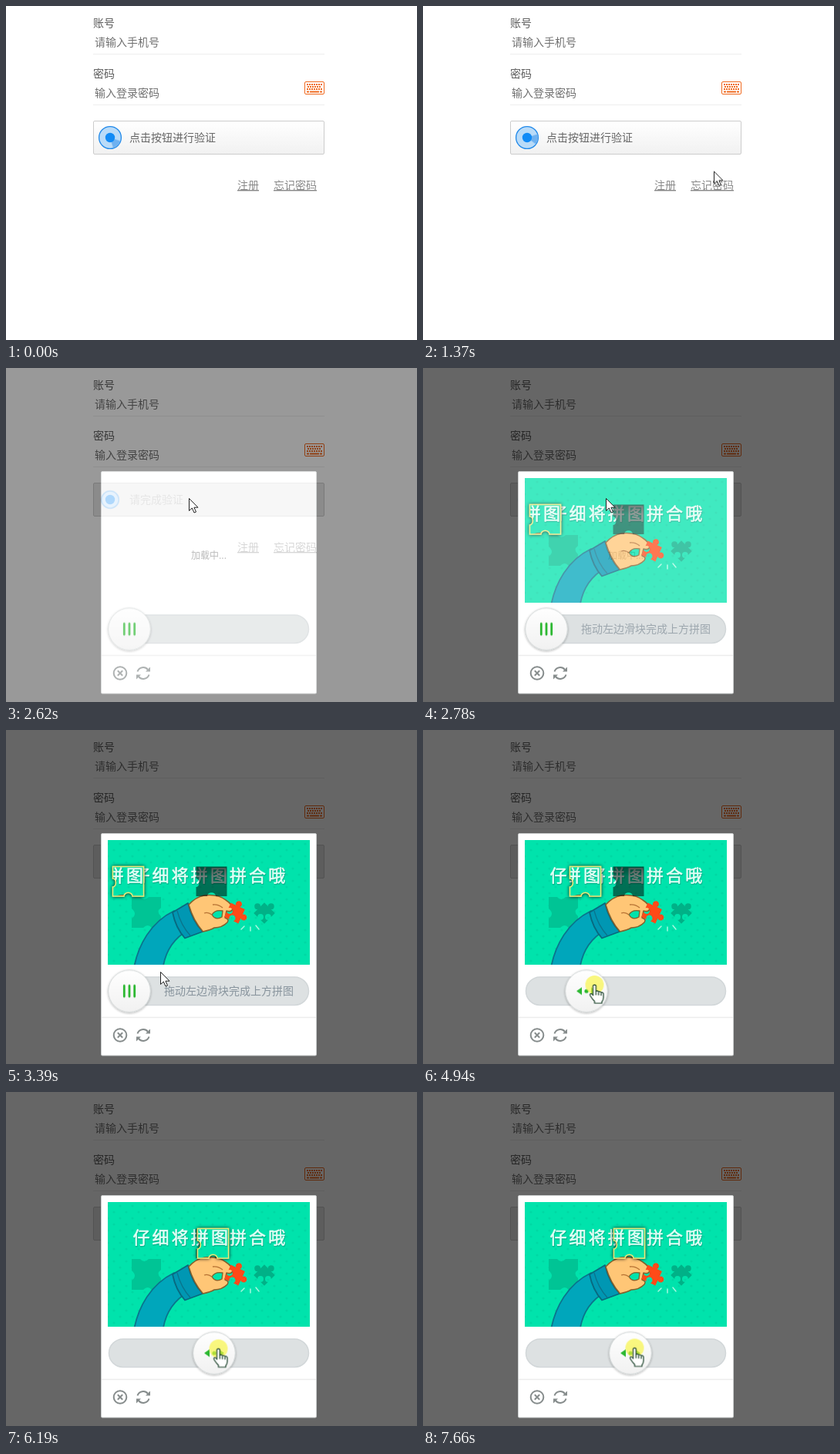
An HTML page for the animation above (8000 ms loop, 533 by 434 pixels).

```html
<!DOCTYPE html>
<html lang="zh">
<head>
<meta charset="utf-8">
<title>滑块验证</title>
<style>
html, body { margin: 0; width: 100%; height: 100%; overflow: hidden; background: #fff; }
svg { display: block; width: 533px; height: 434px; }
text { font: 14px "Noto Sans CJK SC", "Noto Sans CJK", "Noto Sans", sans-serif; }
.link { fill: #888; text-decoration: underline; }
.title { font-size: 22px; font-weight: 500; letter-spacing: 3.1px; stroke-linejoin: round; }

.idle, .done, .arrow, .hand, .press, .rest, .sector, .turn, .ring,
.modal, .load, .drag, .cursor { animation: 8s step-end infinite; }
.idle { animation-name: idle; }
.done { animation-name: done; }
.arrow { animation-name: arrow; }
.hand { animation-name: hand; }
.press { animation-name: press; }
.rest { animation-name: rest; }
.sector { animation-name: sector; }
.ring { animation-name: ring; }
.modal { animation-name: modal; }
.load { animation-name: load; }
.turn { animation-name: turn; }
.drag { animation-name: drag; }
.cursor { animation-name: cursor; }

@keyframes idle { 0% { opacity: 1 } 29.75%, 100% { opacity: 0 } }
@keyframes done { 0% { opacity: 0 } 29.75%, 100% { opacity: 1 } }
@keyframes arrow { 0% { opacity: 0 } 6.375% { opacity: 1 } 20.1% { opacity: 0 } 29.75% { opacity: 1 } 45.4%, 100% { opacity: 0 } }
@keyframes hand { 0% { opacity: 0 } 20.1% { opacity: 1 } 29.75% { opacity: 0 } 45.4%, 100% { opacity: 1 } }
@keyframes press { 0% { opacity: 0 } 57%, 100% { opacity: 1 } }
@keyframes rest { 0% { opacity: 1 } 57%, 100% { opacity: 0 } }
@keyframes sector { 0% { opacity: 1 } 20.1%, 100% { opacity: 0 } }
@keyframes ring {
  0% { transform: scale(1) }
  20.1% { transform: scale(1); animation-timing-function: steps(4, start) }
  24% { transform: scale(.87) }
  31.7%, 100% { transform: scale(.78) }
}
@keyframes modal {
  0% { opacity: 0 }
  31.7% { opacity: 0; animation-timing-function: steps(3, start) }
  34.6%, 100% { opacity: 1 }
}
@keyframes load {
  0% { opacity: 0 }
  33.7% { opacity: .35 }
  34.7% { opacity: .75; animation-timing-function: steps(5, end) }
  39.375%, 100% { opacity: 1 }
}
@keyframes turn {
  0% { transform: rotate(46deg) }
  6.375% { transform: rotate(46deg); animation-timing-function: steps(11, start) }
  17.125% { transform: rotate(11deg); animation-timing-function: steps(4, start) }
  20.1%, 100% { transform: rotate(4deg) }
}
@keyframes drag {
  0% { transform: translateX(0) }
  57% { transform: translateX(0); animation-timing-function: steps(6, start) }
  62.7% { transform: translateX(52px); animation-timing-function: steps(5, start) }
  67.625% { transform: translateX(90px); animation-timing-function: steps(2, start) }
  69.625% { transform: translateX(98px) }
  70.625% { transform: translateX(98px); animation-timing-function: steps(6, start) }
  76.375% { transform: translateX(108px) }
  77.375% { transform: translateX(110px) }
  95.75%, 100% { transform: translateX(109px) }
}
@keyframes cursor {
  0% { transform: translate(426px, 408px) }
  6.375% { transform: translate(426px, 408px); animation-timing-function: steps(11, start) }
  17.125% { transform: translate(391px, 219px); animation-timing-function: steps(11, start) }
  28% { transform: translate(237px, 169px) }
  35.7% { transform: translate(237px, 169px); animation-timing-function: steps(5, start) }
  40.375% { transform: translate(233px, 213px); animation-timing-function: steps(3, start) }
  43.3% { transform: translate(200px, 314px); animation-timing-function: steps(4, start) }
  47.375% { transform: translate(169px, 331px) }
  48.375% { transform: translate(167px, 332px) }
  49.2% { transform: translate(165.5px, 332px) }
  57% { transform: translate(165.5px, 332px); animation-timing-function: steps(6, start) }
  62.7% { transform: translate(222.5px, 331px); animation-timing-function: steps(5, start) }
  67.625% { transform: translate(258px, 333px); animation-timing-function: steps(2, start) }
  69.625% { transform: translate(264.5px, 333px) }
  70.625% { transform: translate(264.5px, 333px); animation-timing-function: steps(6, start) }
  76.375% { transform: translate(273.5px, 333px) }
  77.375% { transform: translate(275.5px, 333.5px) }
  95.75%, 100% { transform: translate(274.5px, 332.5px) }
}
</style>
</head>
<body>
<svg viewBox="0 0 533 434">
<defs>
  <linearGradient id="face" x2="0" y2="1"><stop stop-color="#fff"/><stop offset="1" stop-color="#f1f1f1"/></linearGradient>
  <linearGradient id="shade" x2="0" y2="1"><stop stop-color="#000" stop-opacity=".66"/><stop offset=".35" stop-color="#000" stop-opacity=".5"/><stop offset="1" stop-color="#000" stop-opacity=".52"/></linearGradient>
  <pattern id="dots" width="16" height="16" patternUnits="userSpaceOnUse">
    <g fill="#00d8a4"><circle cx="4" cy="4" r="1.6"/><circle cx="12" cy="12" r="1.6"/></g>
  </pattern>
  <filter id="glow" x="-30%" y="-30%" width="160%" height="160%"><feDropShadow dx="0" dy="0" stdDeviation="2" flood-color="#000" flood-opacity=".95"/></filter>
  <filter id="soft" x="-20%" y="-20%" width="140%" height="140%"><feDropShadow dx="0" dy="1" stdDeviation="1.6" flood-color="#000" flood-opacity=".3"/></filter>
  <clipPath id="frame"><path d="M132 143h262v162h-262z"/></clipPath>
  <path id="cut" d="M247.500 177.500h40v38.500h-14.500a5.500 4.800 0 0 0-11 0h-14.500v-12a4 5.500 0 0 0 0-11z"/>
  <clipPath id="cutClip"><use href="#cut"/></clipPath>
  <path id="jig" d="M-9-9H-2.500a3.600 3.600 0 1 1 5 0H9V-2.500a3.600 3.600 0 1 1 0 5V9H2.500a3.600 3.600 0 1 0-5 0H-9V2.500a3.600 3.600 0 1 0 0-5z"/>

  <g id="art">
    <path fill="#00e3ac" d="M132 143h262v162h-262z"/>
    <path fill="url(#dots)" d="M132 143h262v162h-262z"/>
    <path fill="#00c495" d="M163 217h11q5 6 11 0h16v14q-7 5 0 11v15h-12q-5-6-11 0h-15v-12q8-6 0-13z"/>
    <use href="#jig" fill="#00b187" transform="translate(335 238) rotate(-45) scale(1.080)"/>
    <g stroke-width="1.800" stroke-linejoin="round">
      <path fill="#00a6bb" stroke="#0a748c" d="M166.500 306C172 280 187 250 218 235L236 260C219 270 208 285 204 306z"/>
      <path fill="#0097b3" stroke="#08697f" d="M216 237L236 225Q241 247 255 262L232 270.500Q220 257 216 237z"/>
      <path fill="none" stroke="#0a748c" stroke-width="1.300" d="M222 235Q227 254 239 267"/>
      <path fill="#ffc676" stroke="#84602c" stroke-width="1.500" d="M237 227Q246 217 257 215Q275 213 285 221Q293 226 294 232Q293 237 286 235L284 244Q290 246 287 250Q280 257 270 257Q265 260 255.500 262Q243 248 237 227z"/>
      <path fill="#00e3ac" stroke="#84602c" stroke-width="1.300" d="M267 240Q271 233 281 235L280 243Q272 248 267 240z"/>
      <path fill="none" stroke="#b67334" stroke-width="1.300" d="M267 240Q262 236 257 238M281 231Q275 226 268 227"/>
    </g>
    <use href="#jig" fill="#ff4a18" transform="translate(296.500 238) rotate(25) scale(1.120)"/>
    <path stroke="#a5f7df" stroke-width="1.500" stroke-linecap="round" d="M309 255l-4 4M317 256v5M324 254l4 5"/>
    <text class="title" x="165" y="198" fill="#008a70" stroke="#008a70" stroke-width="1.500" opacity=".45">仔细将拼图拼合哦</text>
    <text class="title" x="164.500" y="197" fill="#e4fff6" stroke="#e4fff6" stroke-width=".6">仔细将拼图拼合哦</text>
  </g>
</defs>

<path fill="#fff" d="M0 0h533v434H0z"/>
<g fill="#5c5c5c"><text x="113" y="27">账号</text><text x="113" y="93">密码</text></g>
<g fill="#707070"><text x="115" y="52">请输入手机号</text><text x="115" y="118">输入登录密码</text></g>
<path stroke="#eee" d="M113 62.500h300M113 128.500h300"/>
<g fill="none" stroke="#f0691e">
  <rect x="387.500" y="98.500" width="25" height="16" rx="1.500"/>
  <g stroke-width="2"><path stroke-dasharray="2 1" d="M390 102h20M390 108h20"/><path stroke-dasharray="2 1" d="M391 105h18"/><path d="M390 111.500h3M394 111.500h12M407 111.500h3"/></g>
</g>

<g class="idle">
  <rect x="113.500" y="149.500" width="299" height="43" rx="1.500" fill="url(#face)" stroke="#ccc"/>
  <text x="160" y="176" fill="#666">点击按钮进行验证</text>
</g>
<g class="done">
  <rect x="113.500" y="149.500" width="299" height="43" rx="1.500" fill="#e8e8e8" stroke="#ccc"/>
  <text x="160" y="176" fill="#b3b3b3">请完成验证</text>
</g>
<g transform="translate(135 171)">
  <g class="ring">
    <circle r="14.400" fill="#b9dbf8" stroke="#2089ea" stroke-width="1.300"/>
    <g class="sector"><path class="turn" fill="#6eb1f0" d="M0 0L12.300-6.500A13.900 13.900 0 0 1 12.300 6.500z"/></g>
  </g>
  <circle r="6.200" fill="#118bf6"/>
</g>
<text class="link" x="300" y="238">注册</text>
<text class="link" x="347" y="238">忘记密码</text>

<g class="modal">
  <path fill="#000" opacity=".6" d="M0 0h533v434H0z"/>
  <rect x="123.500" y="134.500" width="279" height="288.500" rx="1.500" fill="#fff" stroke="#c9cccc"/>
  <text x="263" y="248" text-anchor="middle" fill="#999" style="font-size:12px">加载中...</text>
  <g class="load" clip-path="url(#frame)">
    <use href="#art"/>
    <use href="#cut" x="-1" fill="url(#shade)"/>
    <g class="drag">
      <g transform="translate(-109 0)" filter="url(#glow)">
        <g clip-path="url(#cutClip)"><use href="#art"/></g>
        <use href="#cut" fill="none" stroke="#ece878" stroke-width="1.500"/>
      </g>
    </g>
  </g>
  <rect x="133.500" y="321" width="259" height="36.500" rx="18.250" fill="#dde1e2" stroke="#d2d7d9" stroke-width="1.500"/>
  <g class="load"><text class="rest" x="205" y="344" fill="#88949d">拖动左边滑块完成上方拼图</text></g>
  <path stroke="#ececec" stroke-width="1.500" d="M124 373.500h278"/>
  <g fill="none" stroke="#868c8c" stroke-width="2">
    <circle cx="148" cy="396.500" r="8.300"/>
    <path d="M144.800 393.300l6.400 6.400M151.200 393.300l-6.400 6.400"/>
    <path d="M170.500 394.500A7.800 7.800 0 0 1 184 392M185.500 398.500A7.800 7.800 0 0 1 172 401"/>
    <path fill="#868c8c" stroke="none" d="M187 388.500v6h-6zM169 404.500v-6h6z"/>
  </g>
  <g class="drag">
    <g transform="translate(160 339.300)">
      <circle r="27.300" fill="url(#face)" stroke="#d3d8d8" filter="url(#soft)"/>
      <path class="rest" stroke="#2db832" stroke-width="2.800" stroke-linecap="round" d="M-6.700-7V7M0-7V7M6.700-7V7"/>
      <g class="press" fill="#2db832"><path d="M-13 0l7-5v10zM13 0l-7-5v10z"/><circle r="2.600"/></g>
    </g>
  </g>
</g>

<g class="cursor">
  <circle class="press" r="12" fill="#f8f53c" fill-opacity=".65"/>
  <path class="arrow" fill="#fff" stroke="#222" d="M.5.500V16.500L4.300 13L7 19L9.500 18L6.900 12.200H12z"/>
  <g class="hand" stroke="#123a22" stroke-width="1.200" stroke-linejoin="round">
    <path fill="#fff" d="M-2 14V2a1.900 1.900 0 0 1 3.800 0V8.500q1.600-1.300 3.400 .6q1.800-1 3.300 1q2-.6 3 1.400V17q-.2 3-2 5v2H0V21.500Q-3 18.500-5.500 14.500Q-6.500 11.500-4.500 11.500Q-3.500 11.500-2 14z"/>
    <path fill="none" d="M1.800 8.500v5M5.200 9.500v4.200M8.500 10.500v3.700"/>
  </g>
</g>
</svg>
</body>
</html>
```
